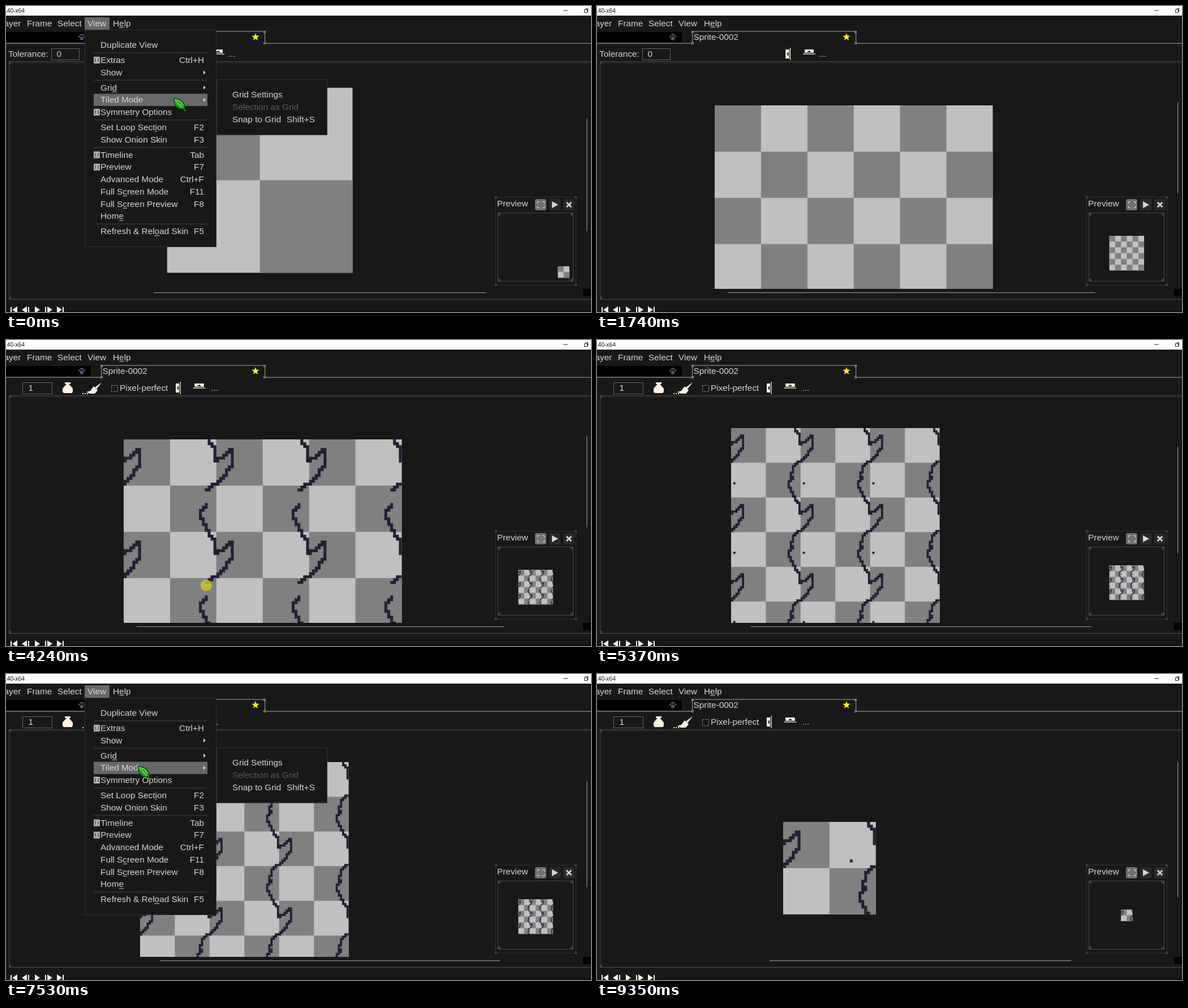
Animation of 1034x542 px, one loop 9480 ms. Source, as an HTML page with a canvas:

```html
<!DOCTYPE html>
<html lang="en">
<head>
<meta charset="utf-8">
<title>Tiled mode</title>
<style>
html, body { margin: 0; width: 100%; height: 100%; overflow: hidden; background: #181818; }
canvas { display: block; }
</style>
</head>
<body>
<canvas id="stage" width="1034" height="542"></canvas>
<script>
const ctx = document.getElementById('stage').getContext('2d');
const LOOP = 9480, BG = '#181818', INK = '#d6d6d6', LINE = '#8a8a8a', HOVER = '#686868';
const CREAM = '#fff3e4', STROKE = '#222034';
const UNIT = .64;            // one sprite pixel at zoom 1
const PX = 2 * UNIT;         // one pixel of the interface
const ROW = 17 * PX, GAP = 4 * PX;
const DRAW_FROM = 2290, DRAW_TO = 4430;

// ---------- helpers ----------
function rect(x, y, w, h, color) {
  ctx.fillStyle = color;
  ctx.fillRect(x, y, w, h);
}
function frame(x, y, w, h, color) {
  ctx.strokeStyle = color;
  ctx.lineWidth = 1;
  ctx.strokeRect(x + .5, y + .5, w - 1, h - 1);
}
function poly(points, color) {
  ctx.fillStyle = color;
  ctx.beginPath();
  points.forEach(([x, y]) => ctx.lineTo(x, y));
  ctx.fill();
}
function disc(x, y, r, color) {
  ctx.fillStyle = color;
  ctx.beginPath();
  ctx.arc(x, y, r, 0, 7);
  ctx.fill();
}
function at(x, y, draw) {
  ctx.save();
  ctx.translate(x, y);
  draw();
  ctx.restore();
}
// An underscore in the label underlines the letter after it.
function text(label, x, cy, color = INK, align = 'left') {
  const [head, tail] = label.split('_');
  ctx.font = `${24 * UNIT}px "Liberation Sans", Arial, sans-serif`;
  ctx.textAlign = align;
  ctx.fillStyle = color;
  ctx.fillText(head + (tail || ''), x, cy + 5);
  if (tail) ctx.fillRect(x + ctx.measureText(head).width, cy + 7, ctx.measureText(tail[0]).width, 1);
}
function triangle(x, cy, w, h, color = INK) {
  poly([[x, cy - h], [x + w, cy], [x, cy + h]], color);
}
const within = (t, ...spans) => spans.some(([a, b]) => t >= a && t < b);
const ease = f => f * f * (3 - 2 * f);

// ---------- pencil stroke: a spline over neighbouring tiles, snapped to pixels ----------
const knots = [[28, 22], [26, 25.5], [28, 30], [31, 35.5], [31.2, 39], [34, 37.3],
               [36.8, 35], [36.8, 40], [33, 45.5], [28.5, 49], [27, 54]];
const knot = i => knots[Math.max(0, Math.min(knots.length - 1, i))];
function spline(u) {
  const i = Math.floor(u), f = u - i;
  return [0, 1].map(k => {
    const [a, b, c, d] = [-1, 0, 1, 2].map(j => knot(i + j)[k]);
    return b + f / 2 * (c - a + f * (2 * a - 5 * b + 4 * c - d + f * (3 * (b - c) + d - a)));
  });
}
const path = [];
for (let u = 0; u <= knots.length - 1; u += .01) {
  const [x, y] = spline(u).map(Math.round), last = path[path.length - 1];
  if (!last || last[0] !== x || last[1] !== y) path.push([x, y]);
}
function strokeLength(t) {
  return Math.floor(path.length * Math.max(0, Math.min(1, (t - DRAW_FROM) / (DRAW_TO - DRAW_FROM))));
}

// ---------- views: top left corner, zoom, tiles per side, middle of the preview ----------
const views = [
  { from: 0,    x: 284.8, y: 144.8, zoom: 16, n: 1, pre: [985.6, 471.2] },
  { from: 1600, x: -43,   y: -183,  zoom: 16, n: 3, pre: [936.3, 437.7] },
  { from: 1740, x: 208,   y: 176,   zoom: 8,  n: 3, pre: [936.3, 437.7] },
  { from: 4900, x: 237,   y: 156,   zoom: 6,  n: 3, pre: [936.3, 429.7] },
  { from: 8600, x: 360,   y: 279,   zoom: 6,  n: 1, pre: [936.3, 427.5] },
  { from: 9050, x: 329,   y: 262,   zoom: 8,  n: 1, pre: [936.3, 427.5] }];

function sprite(x, y, p, n, pixels) {
  const size = 32 * p, cell = size / 2, dot = Math.max(1, p);
  rect(x, y, n * size, n * size, '#c0c0c0');
  for (let j = 0; j < 2 * n; j++)
    for (let i = j % 2; i < 2 * n; i += 2) rect(x + i * cell, y + j * cell, cell, cell, '#808080');
  ctx.fillStyle = STROKE;
  ctx.beginPath();
  for (let j = 0; j < n; j++)
    for (let i = 0; i < n; i++)
      for (const [px, py] of pixels) ctx.rect(x + i * size + px % 32 * p, y + j * size + py % 32 * p, dot, dot);
  ctx.fill();
}
// Start and length of a scroll bar for a canvas in a viewport.
function scrollBar(start, size, middle, extent) {
  const length = extent * extent / (size + Math.max(extent, 2 * (extent - size)));
  const offset = (start + size / 2 - middle) * length / extent;
  return [middle - offset - length / 2, length];
}

// ---------- mouse: eased moves [begin, end, x, y] ----------
const moves = [
  [0, 0, 296, 163], [60, 250, 310, 150], [430, 620, 318, 163], [1080, 1470, 445, 197],
  [2130, DRAW_FROM, 354, 291], [DRAW_TO, DRAW_TO, 349, 455], [4630, 5510, 365, 372],
  [5580, 5910, 197, 47], [5910, 6180, 148, 32], [6680, 6850, 200, 152], [7390, 7530, 233, 163],
  [7930, 8400, 445, 182], [8600, 9350, 450, 330]];
const isDrawing = t => within(t, [DRAW_FROM, DRAW_TO]);

function mouseAt(t) {
  if (isDrawing(t)) {
    const [x, y] = path[Math.min(path.length - 1, strokeLength(t))];
    return [208 + (x + .5) * 8 * UNIT, 176 + (y + .5) * 8 * UNIT];
  }
  let x, y;
  for (const [begin, end, toX, toY] of moves) {
    if (t < begin) break;
    const f = t < end ? ease((t - begin) / (end - begin)) : 1;
    x = f === 1 ? toX : x + (toX - x) * f;
    y = f === 1 ? toY : y + (toY - y) * f;
  }
  return [x, y];
}
function leaf(x, y) {
  at(x, y, () => {
    poly([[14, 15], [18, 16], [22, 23], [20, 24]], '#7a4a24');
    ctx.beginPath();
    ctx.moveTo(0, 1);
    ctx.bezierCurveTo(9, -1, 21, 7, 20, 18);
    ctx.bezierCurveTo(11, 22, 1, 16, 0, 1);
    ctx.fillStyle = '#0fa52c';
    ctx.fill();
    ctx.lineWidth = 1.5;
    ctx.strokeStyle = '#0b4d1b';
    ctx.stroke();
    ctx.beginPath();
    ctx.moveTo(2, 3);
    ctx.quadraticCurveTo(12, 3, 17, 13);
    ctx.moveTo(4, 5);
    ctx.lineTo(16, 17);
    ctx.lineWidth = 1.6;
    ctx.strokeStyle = '#a5d83a';
    ctx.stroke();
  });
}

// ---------- menus: "*" is checked, "-" a separator, ">" a submenu ----------
const viewItems = ['Duplicate View', '-', '*Extras|Ctrl+H', 'Show|>', '-', 'Gri_d|>', 'Tiled Mode|>',
  '*Symmetry Options', '-', 'Set Loop Sect_ion|F2', 'Show Onion Skin|F3', '-', '*Timeline|Tab',
  '*Preview|F7', 'Advanced Mode|Ctrl+F', 'Full S_creen Mode|F11', 'Full S_creen Preview|F8', 'Hom_e',
  '-', 'Refresh & Rel_oad Skin|F5'];
const gridItems = ['Grid Settings', '!Selection as Grid', 'Snap to Grid|Shift+S'];
const tiledItems = ['None', 'Tiled in Both Axes', 'Tiled in X Axis', 'Tiled in Y Axis'];

function check(x, cy) {
  rect(x, cy - 6, 11, 12, '#b0b0b0');
  rect(x + 2, cy - 3, 2, 6, '#6a6a6a');
  rect(x + 7, cy - 3, 2, 6, '#6a6a6a');
}
// Draws a panel with its rows; isHot tells whether a row is lit.
function menu(x, y, w, h, firstRow, items, isHot) {
  rect(x, y, w, h, BG);
  frame(x, y, w, h, '#303030');
  const left = x + 16, right = x + w - 16;
  let cy = firstRow;
  for (const item of items) {
    if (item === '-') {
      rect(left, cy - ROW / 2 + GAP / 2 - PX / 2, right - left, 2, '#303030');
      cy += GAP;
      continue;
    }
    const [label, key] = item.replace(/^[*!]/, '').split('|');
    if (isHot(label, cy)) rect(left, cy - ROW / 2, right - left, ROW, HOVER);
    if (item[0] === '*') check(left, cy);
    text(label, left + 12, cy, item[0] === '!' ? '#5a5a5a' : INK);
    if (key === '>') triangle(right - 7, cy, 4, 3.5);
    else if (key) text(key, right - 6, cy, INK, 'right');
    cy += ROW;
  }
}
function menus(t, mx, my) {
  const inSub = mx > 373, under = cy => Math.abs(my - cy) < ROW / 2;
  rect(139, 20, 44, 22, HOVER);
  text('View', 144, 30.5);
  menu(139, 42, 233, 385, 69, viewItems, (label, cy) => inSub ? label === 'Tiled Mode' : under(cy));
  if (within(t, [0, 880], [7060, 7720])) {
    menu(372, 130, 196, 98.5, 157.4, gridItems, () => false);
  } else if (within(t, [880, 1600], [7720, 8600])) {
    const current = t < 1600 ? 0 : 1;
    menu(372, 152, 183, 120, 179.2, tiledItems.map((s, i) => i === current ? '*' + s : s),
      (label, cy) => inSub && under(cy));
  }
}

// ---------- window parts ----------
function symmetryIcon(x, y, turn) {
  at(x, y, () => {
    ctx.rotate(turn);
    rect(-.6, -11, PX, 22, CREAM);
    for (const side of [-1, 1]) {
      ctx.scale(side, 1);
      rect(2, -8, 6, 16, CREAM);
      triangle(3, 0, 3, 4, BG);
    }
  });
}
function cornerMarks(x, y, w, h, color) {
  for (const cx of [x, x + w]) for (const cy of [y, y + h]) frame(cx - 2, cy - 2, 4, 4, color);
}
function titleAndTabs() {
  rect(0, 0, 1034, 17, '#fff');
  ctx.font = '10px "Open Sans", "Noto Sans", sans-serif';
  ctx.textAlign = 'right';
  ctx.fillStyle = '#000';
  ctx.fillText('.40-x64', 33, 12);
  rect(985, 7.5, 8, 1, '#222');
  frame(1022, 6, 6, 6, '#222');
  rect(1024, 4, 5, 1, '#222');
  rect(1028, 4, 1, 6, '#222');

  text('ayer', -3.5, 30.5);
  text('Frame', 37, 30.5);
  text('Select', 91, 30.5);
  text('View', 144, 30.5);
  text('H_elp', 189, 30.5);

  rect(0, 46, 150, 18, '#000');
  disc(134, 57.5, 3.3, '#55506e');
  for (let i = 0; i < 4; i++) disc(129.5 + i * 3.1, i % 3 ? 51 : 54, 1.7, '#55506e');
  rect(0, 65.6, 168, PX, LINE);
  rect(458, 65.6, 576, PX, LINE);
  rect(168, 44.4, 290, PX, LINE);
  rect(168, 44.4, PX, 22, LINE);
  rect(457, 44.4, PX, 22, LINE);
  cornerMarks(169, 46, 288, 20, LINE);
  text('Sprite-0002', 170.5, 55);
  const star = [];
  for (let i = 0; i < 10; i++) {
    const r = i % 2 ? 3 : 7, a = i * Math.PI / 5;
    star.push([441 + r * Math.sin(a), 55 - r * Math.cos(a)]);
  }
  poly(star, '#ffea1c');
}
function toolbar(bucket) {
  const shift = bucket ? 33.5 : 0;
  if (bucket) {
    text('Tolerance:', 4, 85);
    frame(80, 75, 50, 21, HOVER);
    text('0', 89.5, 85);
  } else {
    rect(14, 84, 1, 2, '#555');
    frame(29, 75, 53, 21, HOVER);
    text('1', 39.5, 85);
    // ink bottle
    rect(104, 75, 10, 3, CREAM);
    rect(106, 78, 6, 3, CREAM);
    poly([[105, 80], [113, 80], [118, 86], [118, 92], [116, 94], [102, 94], [100, 92], [100, 86]], CREAM);
    // brush
    poly([[169, 75], [160, 87], [157, 84]], CREAM);
    poly([[155, 82], [162, 89], [157, 95], [148, 95], [142, 92], [149, 90]], CREAM);
    for (let x = 135; x < 146; x += 4) rect(x, 94, 2, 2, CREAM);
    ctx.setLineDash([3, 1.5]);
    frame(186, 80, 12, 12, LINE);
    ctx.setLineDash([]);
    text('Pixel-perfect', 201, 85);
  }
  symmetryIcon(308 + shift, 85, 0);
  symmetryIcon(341.5 + shift, 85, Math.PI / 2);
  text('...', 362.5 + shift * .9, 85);
}
function editor(view, pixels) {
  const p = view.zoom * UNIT, size = 32 * p * view.n;
  rect(5, 98, 1029, PX, '#484848');
  rect(8, 100.5, 1026, PX, '#282828');
  rect(5, 98, PX, 421, '#3c3c3c');
  rect(5, 519, 1029, PX, '#484848');
  cornerMarks(7, 101, 0, 416, '#555');
  ctx.save();
  ctx.beginPath();
  ctx.rect(11, 104, 1010, 397);
  ctx.clip();
  sprite(view.x, view.y, p, view.n, pixels);
  ctx.restore();
  // bars stay where they are until the zoom changes
  const shown = view.from === 1600 ? views[0] : view, shownSize = 32 * shown.zoom * UNIT * shown.n;
  const [left, width] = scrollBar(shown.x, shownSize, 515, 977);
  const [top, height] = scrollBar(shown.y, shownSize, 302.5, 374);
  rect(left, 507, width, PX, LINE);
  rect(1026, top, PX, height, LINE);
  rect(1020, 501, 14, 13, '#000');
  // playback buttons, cut by the lower edge
  for (const x of [8, 39, 69, 100]) rect(x, 533, 2, 9, CREAM);
  for (const x of [20, 37]) triangle(x, 538, -9, 6, CREAM);
  for (const x of [51, 73, 90]) triangle(x, 538, 9, 6, CREAM);
  rect(107, 540, 927, 2, '#0c0c0c');
}
function previewWindow(view, pixels) {
  rect(865, 338, 143, 157, BG);
  frame(865, 338, 143, 157, '#303030');
  cornerMarks(866, 339, 141, 155, '#484848');
  frame(869, 366, 134, 122, '#4a4a4a');
  cornerMarks(872, 369, 128, 116, '#555');
  text('Preview', 868, 349.5);
  [945, 970, 995].forEach((x, i) => {
    ctx.fillStyle = i ? '#292929' : '#707070';
    ctx.beginPath();
    ctx.roundRect(x - 10, 342, 20, 20, 3);
    ctx.fill();
  });
  frame(939, 346, 13, 12, INK);
  rect(943, 345, 5, 14, '#707070');
  rect(938, 350, 15, 4, '#707070');
  triangle(965, 352, 11, 6);
  at(995, 352, () => {
    ctx.rotate(Math.PI / 4);
    rect(-6, -1.3, 12, 2.6, INK);
    rect(-1.3, -6, 2.6, 12, INK);
  });
  const half = 16 * UNIT * view.n;
  sprite(view.pre[0] - half, view.pre[1] - half, UNIT, view.n, pixels);
}

// ---------- picture at time t ----------
function draw(t) {
  const view = views.filter(v => v.from <= t).pop();
  const menuOpen = within(t, [0, 1600], [6380, 8600]);
  const [mx, my] = mouseAt(t);
  const useLeaf = menuOpen || my < 99;
  const pixels = path.slice(0, strokeLength(t));
  if (!useLeaf && t >= 2130 && !isDrawing(t)) {
    const hover = [mx - view.x, my - view.y].map(d => Math.floor(d / view.zoom / UNIT));
    if (hover.every(c => c >= 0 && c < 32 * view.n)) pixels.push(hover);
  }

  rect(0, 0, 1034, 542, BG);
  titleAndTabs();
  toolbar(t < 2130);
  editor(view, pixels);
  previewWindow(view, pixels);
  if (menuOpen) menus(t, mx, my);
  if (isDrawing(t) || within(t, [1400, 1600], [6380, 6520], [8470, 8600]))
    disc(mx, my, 10, 'rgba(208,200,36,.82)');
  if (useLeaf) leaf(mx, my);
  else for (const d of [-2, 2]) rect(mx + d, my, 1, 1, '#bbb');
}
const start = performance.now();
function tick() {
  draw((performance.now() - start) % LOOP);
  requestAnimationFrame(tick);
}
tick();
</script>
</body>
</html>
```
